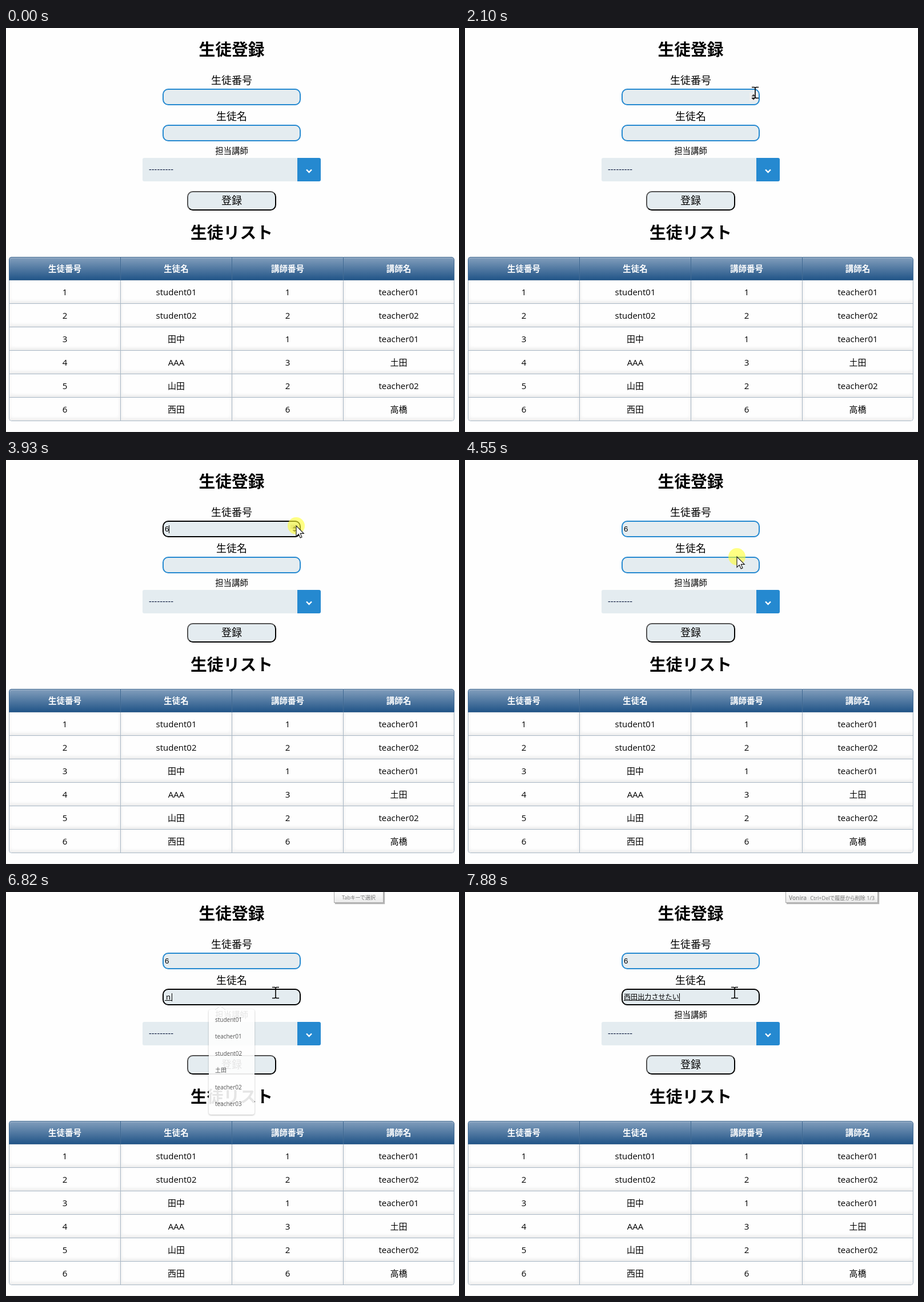
These frames come from a looping animation (793 px wide and 706 px high, 8 s). An HTML page:

```html
<!DOCTYPE html>
<html lang="ja">
<head>
<meta charset="utf-8">
<style>
html, body { margin: 0; width: 100%; height: 100%; overflow: hidden; background: #fefefe; }
body { position: relative; color: #000; font: 15px "Open Sans", "Noto Sans CJK JP", "Noto Sans CJK", sans-serif; }
body > * { position: absolute; box-sizing: border-box; }
.label { left: 195px; width: 400px; height: 40px; line-height: 40px; text-align: center; font-size: 18px; }
h1.label { margin: 0; font-size: 28.8px; }
.field { left: 274px; width: 242px; height: 29px; border: 2px solid #2589d0; border-radius: 10px; background: #e4ecf0; padding: 5px 2px; }
.field.focus { border-color: #000; }
.field span { display: inline-block; height: 14px; line-height: 14px; vertical-align: top; margin-top: 1px; border-right: 1px solid transparent; white-space: pre; }
.field span.caret { border-right-color: #000; }
#num { font: 13.33px "Liberation Sans", sans-serif; }
#name span { font-size: 12.1px; text-decoration: underline; text-underline-offset: 1px; }
#select { left: 239px; top: 227px; width: 312px; height: 41px; border-radius: 3px; padding-left: 11px; color: #0c1c40;
  background: linear-gradient(90deg, #e4ecf0 271px, #2589d0 271px); font: 14.4px/41px "Liberation Sans", sans-serif; }
#send { left: 317px; top: 285px; width: 156px; height: 34px; border: 2px outset #000; border-radius: 10px; background: #e4ecf0;
  font-size: 18px; line-height: 29px; text-align: center; }
table { left: 5px; top: 400px; width: 780px; border-spacing: 0; table-layout: fixed; }
th, td { box-sizing: border-box; height: 41px; padding: 0; text-align: center; line-height: 20px; }
th { border: 1px solid #3c6690; border-right: 0; background: linear-gradient(#829ebc, #225588); color: #fff; font-size: 14.5px;
  box-shadow: inset 0 1px 1px rgba(255,255,255,.3); }
td { border: solid #a8b7c5; border-width: 0 0 1px 1px; box-shadow: inset 0 -3px 5px 1px #eee; }
th:last-child { border-right: 1px solid #3c6690; border-radius: 0 5px 0 0; }
th:first-child { border-radius: 5px 0 0 0; }
td:last-child { border-right: 1px solid #a8b7c5; }
tr:last-child td:first-child { border-radius: 0 0 0 5px; }
tr:last-child td:last-child { border-radius: 0 0 5px 0; }
#list { left: 355px; top: 205px; width: 80px; height: 184px; padding: 4px 0 0 11px; border-radius: 4px; background: #fefefe;
  box-shadow: 0 1px 3px rgba(0,0,0,.3); color: #444; font-size: 10px; line-height: 29.4px; }
#list svg { position: absolute; left: 10px; top: -7px; }
#tip { top: -2px; height: 21px; border: 1px solid #aaa; background: linear-gradient(#fff, #eaeaea); box-shadow: 2px 2px 1px #b5b5b5;
  color: #777; font-size: 9.2px; line-height: 22px; text-align: center; white-space: nowrap; font-feature-settings: "palt"; }
#tip b { font-weight: 600; font-size: 10px; color: #888; margin-right: 6px; }
#foot { left: 0; top: 705px; width: 793px; height: 1px; background: #eee; }
#overlay { left: 0; top: 0; }
</style>
</head>
<body>
<h1 class="label" style="top:17px">生徒登録</h1>
<div class="label" style="top:71px">生徒番号</div>
<div class="field" id="num" style="top:106px"><span></span></div>
<div class="label" style="top:134px">生徒名</div>
<div class="field" id="name" style="top:169px"><span></span></div>
<div class="label" style="top:195px;font-size:14.4px">担当講師</div>
<div id="select">---------</div>
<div id="send">登録</div>
<h1 class="label" style="top:337px">生徒リスト</h1>
<table></table>
<div id="foot"></div>
<div id="list">
  <svg width="20" height="9"><path d="M1 8L10 1L19 8" fill="#fefefe" stroke="#ddd"/></svg>
  student01<br>teacher01<br>student02<br>土田<br>teacher02<br>teacher03
</div>
<div id="tip"></div>
<svg id="overlay" width="793" height="706" fill="none">
  <path d="M526 247.5l4.5 4.5 4.5-4.5" stroke="#fff" stroke-width="2.4"/>
  <g id="spin">
    <path d="M498 113h14v15h-14z" fill="#efefef"/>
    <path id="spinHot" d="M498 113h14v7.5h-14z" fill="#cfcfcf"/>
    <path d="M501.5 119.5l3.5-4 3.5 4zM501.5 122l3.5 4 3.5-4z" fill="#444"/>
  </g>
  <g id="cursor">
    <circle id="flash" r="15" fill="#ffff30" fill-opacity=".6"/>
    <path id="arrow" d="M0 0V18.5L4.3 14.4L7.2 21L10 19.8L7.2 13.4H13.3Z" fill="#fff" stroke="#111" stroke-width="1.1"/>
    <path id="beam" d="M-6-9.5h4.5L0-8.5L1.5-9.5H6M0-8.5V8.5M-6 9.5h4.5L0 8.5L1.5 9.5H6" stroke="#000" stroke-width="1.6"/>
  </g>
</svg>
<script>
const $ = id => document.getElementById(id);
const within = (t, a, b) => t >= a && t < b;
const show = (id, on) => $(id).style.display = on ? '' : 'none';

const row = (tag, text) => '<tr>' + text.split(' ').map(c => `<${tag}>${c}</${tag}>`).join('') + '</tr>';
document.querySelector('table').innerHTML = row('th', '生徒番号 生徒名 講師番号 講師名') + [
  '1 student01 1 teacher01', '2 student02 2 teacher02', '3 田中 1 teacher01',
  '4 AAA 3 土田', '5 山田 2 teacher02', '6 西田 6 高橋'
].map(r => row('td', r)).join('');

// time, x, y of the pointer
const path = [
  [320, 777, 376], [600, 655, 245], [850, 560, 150], [1020, 516, 119], [1090, 512, 117],
  [1350, 512, 117], [1560, 507, 109], [1830, 507, 109], [1900, 508, 111], [2030, 508, 111],
  [2100, 508, 113], [2170, 508, 113], [2370, 508, 115], [4070, 508, 115], [4200, 502, 132],
  [4340, 486, 160], [4480, 476, 169], [4759, 476, 169], [4760, 473, 175], [4820, 472, 176], [8000, 472, 176]
];
const clicks = [2770, 2970, 3170, 3360, 3590, 3930];
const typed = [[6750, 'ｎ'], [7020, 'に'], [7220, 'にｓ'], [7350, 'にし'], [7500, 'にしｄ'], [7650, 'にしだ'], [7880, '西田出力させたい']];

function pointer(t) {
  const i = Math.max(1, path.findIndex(p => p[0] > t));
  const [a, b] = [path[i - 1], path[i]];
  const k = Math.max(0, (t - a[0]) / (b[0] - a[0]));
  return [1, 2].map(n => a[n] + (b[n] - a[n]) * k);
}

function setField(id, text, focus, caret) {
  const span = $(id).firstElementChild;
  if (span.textContent !== text) span.textContent = text;
  $(id).classList.toggle('focus', focus);
  span.classList.toggle('caret', caret);
}

let tipState;
function setTip(t) {
  const state = t < 6750 ? 0 : t < 7020 ? 1 : t < 7880 ? 2 : 3;
  if (state === tipState) return;
  tipState = state;
  const tip = $('tip');
  show('tip', state);
  tip.style.left = [0, 574, 579, 561][state] + 'px';
  tip.style.width = (state === 3 ? 162 : 87) + 'px';
  tip.innerHTML = state === 3 ? '<b>Vonira</b>Ctrl+Delで履歴から削除 1/3' : 'Tabキーで選択';
}

function draw(t) {
  const count = clicks.filter(c => c <= t).length;
  const numFocus = within(t, 2770, 4550);
  setField('num', count ? String(count) : '', numFocus, numFocus);

  const entry = typed.filter(e => e[0] <= t).pop();
  const caret = within(t, 4620, 5150) || within(t, 5680, 6210) || t >= 6750;
  setField('name', entry ? entry[1] : '', t >= 4620, caret);

  show('list', within(t, 4690, 7020));
  $('list').style.opacity = t < 6820 ? 1 : Math.max(0, .9 - .3 * Math.floor((t - 6820) / 67));
  setTip(t);

  const [x, y] = pointer(t);
  const beam = within(t, 1020, 2170) || t >= 4760;
  $('cursor').setAttribute('transform', `translate(${x} ${y})`);
  show('cursor', t >= 320);
  show('beam', beam);
  show('arrow', !beam);
  show('flash', clicks.some(c => within(t, c, c + 70)) || within(t, 4550, 4620));
  show('spin', within(t, 1020, 4550));
  show('spinHot', within(t, 2170, 4130));
}

const start = performance.now();
function tick() {
  draw((performance.now() - start) % 8000);
  requestAnimationFrame(tick);
}
tick();
</script>
</body>
</html>
```
